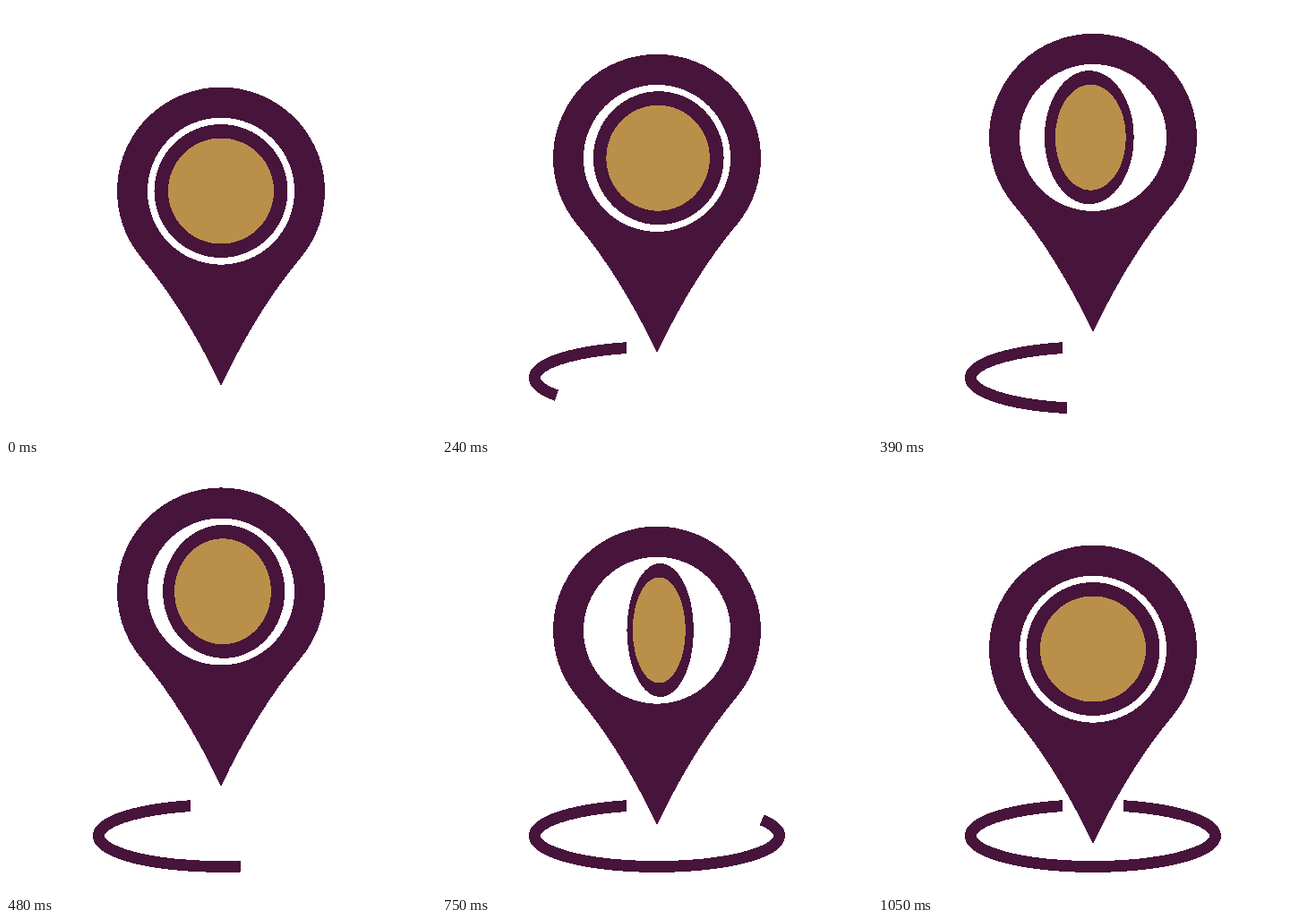
An HTML page for the animation above (1.8 s loop, 480 by 480 pixels).

```html
<!DOCTYPE html>
<html lang="en">
<head>
<meta charset="utf-8">
<title>Location pin</title>
<style>
  html, body { margin: 0; width: 100%; height: 100%; overflow: hidden; background: #fff; }
  svg { display: block; width: 100vw; height: 100vh; }
</style>
</head>
<body>
<svg viewBox="0 0 480 480" shape-rendering="crispEdges">
  <path id="ring" d="M206 381.6A136.6 34.5 0 1 0 274 381.6" pathLength="521"
        fill="none" stroke="#47143c" stroke-width="12.8"/>
  <g id="pin">
    <path fill="#47143c" d="M151 281A116 116 0 1 1 329 281Q281 338 240 424Q199 338 151 281Z"/>
    <circle cx="240" cy="206.7" r="82" fill="#fff"/>
    <ellipse id="coin" cy="206.5" fill="#47143c"/>
    <ellipse id="badge" cy="206.5" fill="#ba8f49"/>
  </g>
</svg>
<script>
const LOOP = 1800, STEP = 30, SPIN_END = 900;
const [ring, pin, coin, badge] = ["ring", "pin", "coin", "badge"].map(id => document.getElementById(id));

// Vertical pin offset: [time, y]
const lift = [[0, 0], [450, -69], [900, 3], [1050, 0], [LOOP, 0]];

function track(keys, t) {
  const i = keys.findIndex(key => t < key[0]);
  const [t0, a] = keys[i - 1], [t1, b] = keys[i];
  return a + (b - a) * (t - t0) / (t1 - t0);
}

// A disc turning about its vertical axis, seen with slight perspective
function turn(disc, r, angle) {
  disc.setAttribute("cx", 240 - r * r / 1300 * Math.sin(2 * angle));
  disc.setAttribute("rx", r * Math.abs(Math.cos(angle)));
  disc.setAttribute("ry", r);
}

function draw(now) {
  const t = Math.floor(now % LOOP / STEP) * STEP;
  const p = Math.min(t / SPIN_END, 1);
  const angle = -4 * Math.PI * p;

  pin.setAttribute("transform", `translate(0 ${track(lift, t)})`);
  turn(coin, 74.5, angle);
  turn(badge, 59, angle);
  ring.setAttribute("visibility", t ? "visible" : "hidden");
  ring.setAttribute("stroke-dasharray", `${10 + 511 * p} 600`);
}

const start = performance.now();
function frame() {
  draw(performance.now() - start);
  requestAnimationFrame(frame);
}
frame();
</script>
</body>
</html>
```
